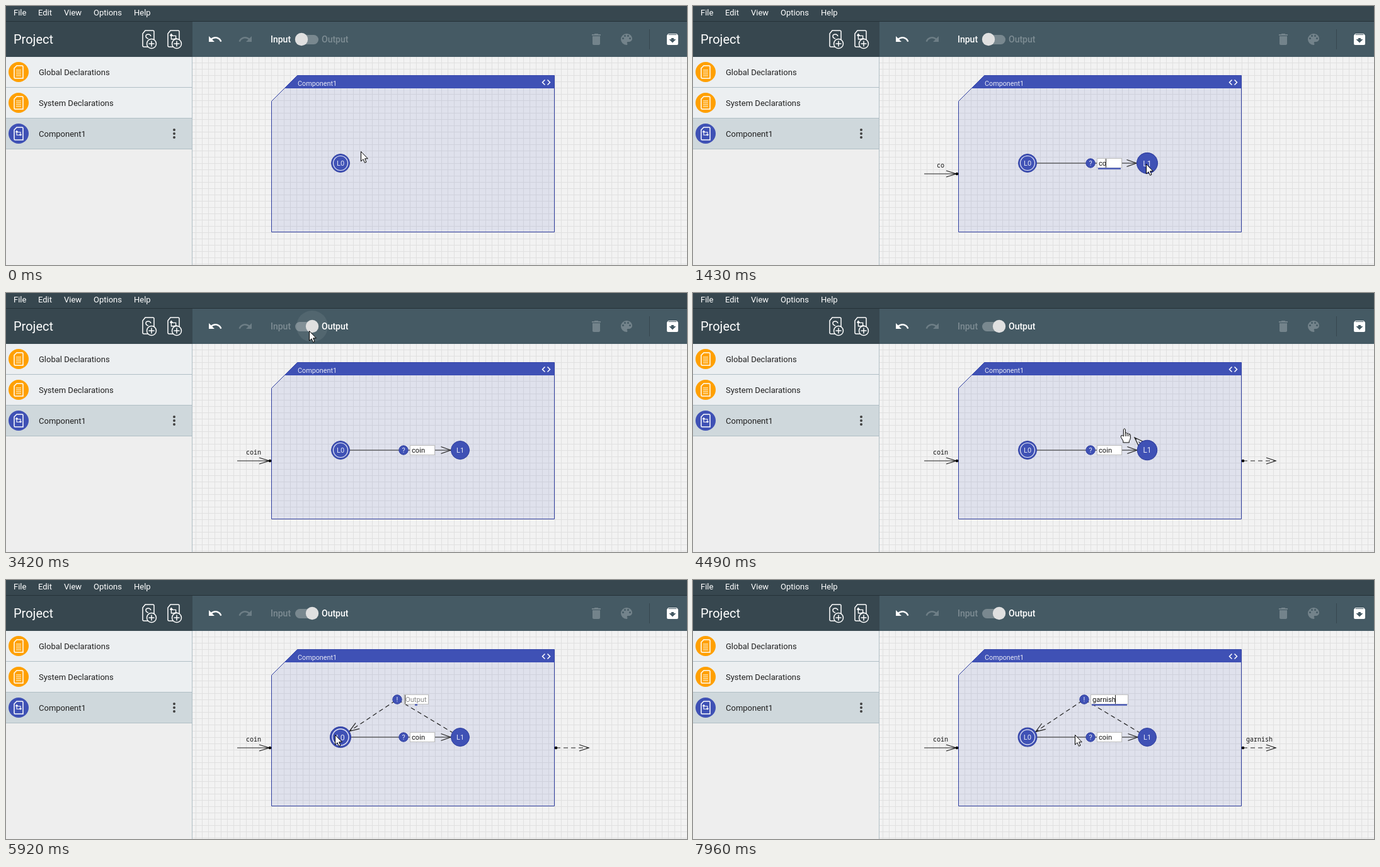
These frames come from a looping animation (1081x412 px, 8000 ms). An HTML page:

```html
<!DOCTYPE html>
<html lang="en">
<head>
<meta charset="utf-8">
<title>Component editor</title>
<style>
html, body { margin: 0; width: 100%; height: 100%; overflow: hidden; background: #f2f2f2; }
svg { display: block; font: 13px Roboto, sans-serif; }
.line { fill: none; stroke: #222; stroke-width: 1.2; }
.icon { fill: none; stroke: #fff; stroke-width: 1.5; }
.dash { stroke-dasharray: 7 5; }
.small { font-size: 11.2px; }
.label { font: 10px "Noto Sans Mono", "DejaVu Sans Mono", monospace; text-anchor: middle; fill: #111; }
.node { fill: #3f51b5; stroke: #303f9f; }
.name { font-size: 11px; fill: #e8eaf6; text-anchor: middle; }
.mode { font-size: 14px; font-weight: 500; }
</style>
</head>
<body>
<svg width="1081" height="412" viewBox="0 0 1081 412">
  <defs>
    <pattern id="grid" x="1" width="10" height="10" patternUnits="userSpaceOnUse">
      <path d="M.5 0V10M0 .5H10" stroke="#e0e0e0"/>
    </pattern>
    <g id="loop"><path d="M-6 -3H4V4M-4 -6V3H6M1.8 1.5 4 4 6.2 1.5M-6.2 -3.5 -4 -6 -1.8 -3.5"/></g>
    <g id="plus" class="icon">
      <circle cx="4" cy="7" r="7.5" fill="#37474f"/>
      <path d="M4 2.5V11.5M-.5 7H8.5"/>
    </g>
    <path id="file" d="M-5 -13H7Q9 -13 9 -11V13H-7Q-9 13 -9 11V-8Z"/>
    <path id="sheet" d="M-3 -10H5.5Q7 -10 7 -8.500V10H-5.500Q-7 10 -7 8.500V-6Z"/>
    <g id="doc">
      <circle r="16" fill="#ffa000"/>
      <g class="icon"><use href="#sheet"/><path d="M-4 -3H4M-4 0H4M-4 3H4M-4 6H4" stroke-width="1.2"/></g>
    </g>
  </defs>

  <rect x="296" y="81" width="785" height="331" fill="#f2f2f2"/>
  <rect x="296" y="81" width="785" height="331" fill="url(#grid)"/>

  <!-- component frame -->
  <path d="M421.5 151.500 462.500 110.500H870.500V359.500H421.500Z" fill="#3f51b5" fill-opacity=".11" stroke="#303f9f"/>
  <path d="M462.500 110.500H870.500V131H442Z" fill="#3f51b5"/>
  <text x="463" y="127" font-size="10.8" fill="#e8eaf6">Component1</text>
  <path class="icon" d="M855.500 117.500 851.500 121.500 855.500 125.500M859.500 117.500 863.500 121.500 859.500 125.500"/>

  <!-- side panel -->
  <rect y="81" width="295" height="331" fill="#eee"/>
  <rect y="81" width="295" height="97" fill="#eceff1"/>
  <rect y="179" width="295" height="48" fill="#cfd8dc"/>
  <path d="M0 129.500H295M0 178.500H295M0 227.500H295M295.500 81V412" stroke="#b0bec5"/>
  <use href="#doc" x="20" y="105"/>
  <use href="#doc" x="20" y="154"/>
  <g transform="translate(20 203)">
    <circle r="16" fill="#3f51b5"/>
    <g class="icon"><use href="#sheet"/><use href="#loop" transform="scale(.75)"/></g>
  </g>
  <g fill="#212121">
    <text x="52" y="110">Global Declarations</text>
    <text x="52" y="159">System Declarations</text>
    <text x="52" y="208">Component1</text>
  </g>
  <g fill="#424242"><circle cx="267" cy="197" r="2"/><circle cx="267" cy="203" r="2"/><circle cx="267" cy="209" r="2"/></g>

  <!-- menu and toolbar -->
  <rect width="1081" height="81" fill="#37474f"/>
  <rect x="296" y="25" width="785" height="56" fill="#455a64"/>
  <path d="M0 24.500H1081" stroke="#263238"/>
  <path d="M1021.500 37V69" stroke="#37474f"/>
  <g fill="#fff">
    <text x="12" y="15">File</text><text x="51" y="15">Edit</text><text x="92" y="15">View</text>
    <text x="139" y="15">Options</text><text x="203" y="15">Help</text>
    <text x="12" y="60" font-size="20">Project</text>
    <path transform="translate(320 41)" d="M12.500 8c-2.650 0-5.050.99-6.900 2.600L2 7v9h9l-3.620-3.620c1.390-1.160 3.160-1.880 5.120-1.880 3.540 0 6.550 2.310 7.600 5.500l2.370-.78C21.080 11.030 17.150 8 12.500 8z"/>
    <path transform="matrix(-1 0 0 1 392 41)" opacity=".22" d="M12.500 8c-2.650 0-5.050.99-6.900 2.600L2 7v9h9l-3.620-3.620c1.390-1.160 3.160-1.880 5.120-1.880 3.540 0 6.550 2.310 7.600 5.500l2.370-.78C21.080 11.030 17.150 8 12.500 8z"/>
    <path transform="translate(925 41)" opacity=".25" d="M6 19c0 1.100.9 2 2 2h8c1.100 0 2-.9 2-2V7H6zM19 4h-3.500l-1-1h-5l-1 1H5v2h14z"/>
    <g transform="translate(973 41)">
      <path opacity=".25" d="M12 3a9 9 0 0 0 0 18c.83 0 1.500-.67 1.500-1.500 0-.39-.15-.74-.39-1.010-.23-.26-.38-.61-.38-.99 0-.83.67-1.500 1.500-1.500H16c2.760 0 5-2.240 5-5 0-4.420-4.030-8-9-8z"/>
      <g fill="#455a64"><circle cx="6.500" cy="10.500" r="1.500"/><circle cx="9.500" cy="6.500" r="1.500"/><circle cx="14.500" cy="6.500" r="1.500"/><circle cx="17.500" cy="10.500" r="1.500"/></g>
    </g>
    <path transform="translate(1046 41)" fill-rule="evenodd" d="M20.540 5.230 19.150 3.550Q18.700 3 18 3H6Q5.300 3 4.840 3.550L3.460 5.230Q3 5.800 3 6.500V19q0 2 2 2h14q2 0 2-2V6.500q0-.7-.46-1.270zM12 17.500 6.500 12H10v-2h4v2h3.500zM5.120 5l.81-1h12l.94 1z"/>
  </g>
  <g class="icon">
    <use href="#file" x="226" y="52"/><path d="M230 48Q229 45 226 45 222 45 222 48 222 51 226 52"/>
    <use href="#file" x="266" y="52"/><use href="#loop" transform="translate(266 50) scale(.9)"/>
  </g>
  <use href="#plus" x="227" y="53"/><use href="#plus" x="267" y="53"/>
  <text id="inMode" class="mode" x="420" y="58" fill="#fff">Input</text>
  <text id="outMode" class="mode" x="501" y="58" fill="#fff">Output</text>
  <rect x="459" y="46" width="37" height="15" rx="7.500" fill="#fff" opacity=".28"/>
  <circle id="ripple" cx="486" cy="53" r="25" fill="#fff" fill-opacity=".07"/>
  <circle id="knob" cy="53" r="10.200" fill="#e0e0e0"/>

  <!-- ports -->
  <g id="inPort">
    <path class="line" stroke-width="1" d="M367 267H418M402 262 418 267 402 272"/><circle cx="419" cy="267" r="2.300"/>
    <text id="inLabel" class="label" x="393" y="257"></text>
  </g>
  <g id="outPort">
    <path class="line dash" d="M873 267H925"/><path class="line" d="M910 262 925 267 910 272"/><circle cx="873" cy="267" r="2.300"/>
    <text id="outLabel" class="label" x="899" y="257"></text>
  </g>

  <!-- automaton -->
  <path id="edge1" class="line"/><path id="head1" class="line"/>
  <path id="edge2" class="line dash"/><path id="head2" class="line"/>
  <g id="node0"><circle class="node" r="14.500"/><circle r="11.500" fill="none" stroke="#e8eaf6" stroke-width="1.200"/><text class="name" y="4">L0</text></g>
  <g id="node1"><circle class="node" r="14.500"/><text class="name" y="4">L1</text></g>
  <g id="fields"></g>

  <g id="pointer" stroke="#000" fill="#fff" stroke-linejoin="round">
    <path id="arrow" d="M.5 .5V16L4 12.700 6.500 18.300 9 17.200 6.600 11.800H11.300Z"/>
    <path id="hand" d="M-1.500 12V1Q0 -1.500 1.500 1V7Q3 5.500 4.200 7.500 5.700 6.500 7 8.500 9 7.500 9.500 10V15Q9 18 7.500 19.500V22H-2V19.500L-5.500 13.500Q-6 10 -3.500 10.500ZM1.500 7V12M4.200 8V12M7 9V12"/>
  </g>
</svg>
<script>
const $ = id => document.getElementById(id);
const set = (el, attrs) => { for (const k in attrs) el.setAttribute(k, attrs[k]); };
const show = (el, on) => el.style.display = on ? '' : 'none';
const between = (t, a, b) => t >= a && t < b;

// Interpolates keys of the form [time, value, ...].
function at(t, keys) {
  const i = keys.findIndex(k => k[0] > t);
  if (i === 0) return keys[0].slice(1);
  if (i < 0) return keys[keys.length - 1].slice(1);
  const a = keys[i - 1], b = keys[i], u = (t - a[0]) / (b[0] - a[0]);
  const e = (u + u * u * (3 - 2 * u)) / 2;
  return a.slice(1).map((v, j) => v + (b[j + 1] - v) * e);
}
const ramp = (t, ...keys) => at(t, keys)[0];

const path = [
  [80, 563, 231], [250, 537, 248], [330, 538, 250], [620, 713, 249], [650, 713, 249], [790, 719, 251],
  [2540, 719, 251], [3060, 481, 60], [3470, 481, 60], [4030, 719, 257],
  [4360, 719, 257], [4490, 685, 216], [4720, 617, 186],
  [5110, 617, 186], [5590, 522, 246], [7830, 522, 246], [7960, 606, 246]
];
const L0 = [531, 250], L1 = [721, 250], nail = [621, 190];

// The free end of an edge trails the pointer and snaps to the grid.
function snapped(t) {
  const [x, y] = at(t - 50, path);
  return [Math.round((x - 1) / 10) * 10 + 1, Math.round(y / 10) * 10];
}

// Point at distance r from node c, on the way to p.
function rim(c, p, r) {
  const d = Math.hypot(p[0] - c[0], p[1] - c[1]) || 1;
  return [c[0] + (p[0] - c[0]) * r / d, c[1] + (p[1] - c[1]) * r / d];
}

function drawEdge(n, points) {
  const [from, tip] = points.slice(-2);
  const a = Math.atan2(tip[1] - from[1], tip[0] - from[0]);
  const wing = s => [tip[0] - 15.500 * Math.cos(a) - s * Math.sin(a), tip[1] - 15.500 * Math.sin(a) + s * Math.cos(a)];
  const moved = Math.hypot(tip[0] - from[0], tip[1] - from[1]) > 17;
  set($('edge' + n), { d: 'M' + points.join('L') });
  set($('head' + n), { d: moved ? 'M' + [wing(-5.500), tip, wing(5.500)].join('L') : '' });
}

function makeField(x, y, sign, hint) {
  const g = document.createElementNS('http://www.w3.org/2000/svg', 'g');
  set(g, { transform: `translate(${x} ${y})` });
  g.innerHTML = `<circle class="node" r="7.200"/><text class="name" y="4">${sign}</text>
    <rect x="10.500" y="-7.500" height="15" fill="#fff" stroke="#bdbdbd"/>
    <text class="small" x="13" y="4"></text>
    <rect y="7.500" height="2.200" fill="#3f51b5"/>
    <path stroke="#222"/>`;
  $('fields').append(g);
  const [box, underline] = g.querySelectorAll('rect'), text = g.querySelector('.small'), caret = g.lastElementChild;
  return (visible, value, focus, blink) => {
    show(g, visible);
    if (!visible) return;
    text.textContent = value || hint;
    set(text, { fill: value ? '#111' : '#888' });
    const length = value ? text.getComputedTextLength() : 0;
    const width = length > 33 ? 60 : 40, half = (width / 2 - 2) * focus;
    set(box, { width: width - 1 });
    set(underline, { x: 10 + width / 2 - half, width: 2 * half });
    set(caret, { d: `M${Math.round(13 + length) - .5} -7V7` });
    show(caret, blink);
  };
}
const inField = makeField(631, 250, '?', 'Input');
const outField = makeField(621, 190, '!', 'Output');

const typed = (t, word, times) => word.slice(0, times.filter(k => k <= t).length);

function draw(t) {
  const coin = typed(t, 'coin', [1300, 1430, 1580, 1720]);
  const garnish = typed(t, 'garnish', [6200, 6330, 6430, 6580, 6610, 6810, 6940]);

  const r0 = ramp(t, [200, 15], [300, 17], [380, 17], [480, 15], [5450, 15], [5600, 17], [7880, 17], [7990, 15]);
  const r1 = ramp(t, [900, 0], [1070, 17], [2560, 17], [2680, 15], [3980, 15], [4060, 17], [4440, 17], [4560, 15]);
  set($('node0'), { transform: `translate(${L0}) scale(${r0 / 15})` });
  set($('node1'), { transform: `translate(${L1}) scale(${r1 / 15})` });

  drawEdge(1, t < 330 ? [L0, L0] : [L0, t < 920 ? snapped(t) : rim(L1, L0, r1)]);
  const end = t < 5500 ? snapped(t) : rim(L0, nail, r0);
  drawEdge(2, t < 4430 ? [L1, L1] : t < 5130 ? [L1, end] : [L1, nail, end]);

  inField(t >= 920, coin, ramp(t, [960, 0], [1110, 1], [3240, 1], [3390, 0]),
    between(t, 960, 2220) || between(t, 2720, 3240));
  outField(t >= 5500, garnish, ramp(t, [5890, 0], [6090, 1]),
    between(t, 5900, 7450) || t >= 7950);

  show($('inPort'), t >= 330);
  show($('outPort'), t >= 4430);
  $('inLabel').textContent = coin;
  $('outLabel').textContent = garnish;

  const on = ramp(t, [3240, 0], [3400, 1]);
  set($('knob'), { cx: 469 + 17 * on });
  set($('inMode'), { opacity: 1 - .7 * on });
  set($('outMode'), { opacity: .3 + .7 * on });
  set($('ripple'), { opacity: ramp(t, [3240, 0], [3320, 1], [3500, 1], [3700, 0]) });

  const hand = between(t, 4400, 5250);
  set($('pointer'), { transform: `translate(${at(t, path)})` });
  show($('hand'), hand);
  show($('arrow'), !hand);
}

const start = performance.now();
(function tick() {
  draw((performance.now() - start) % 8000);
  requestAnimationFrame(tick);
})();
</script>
</body>
</html>
```
